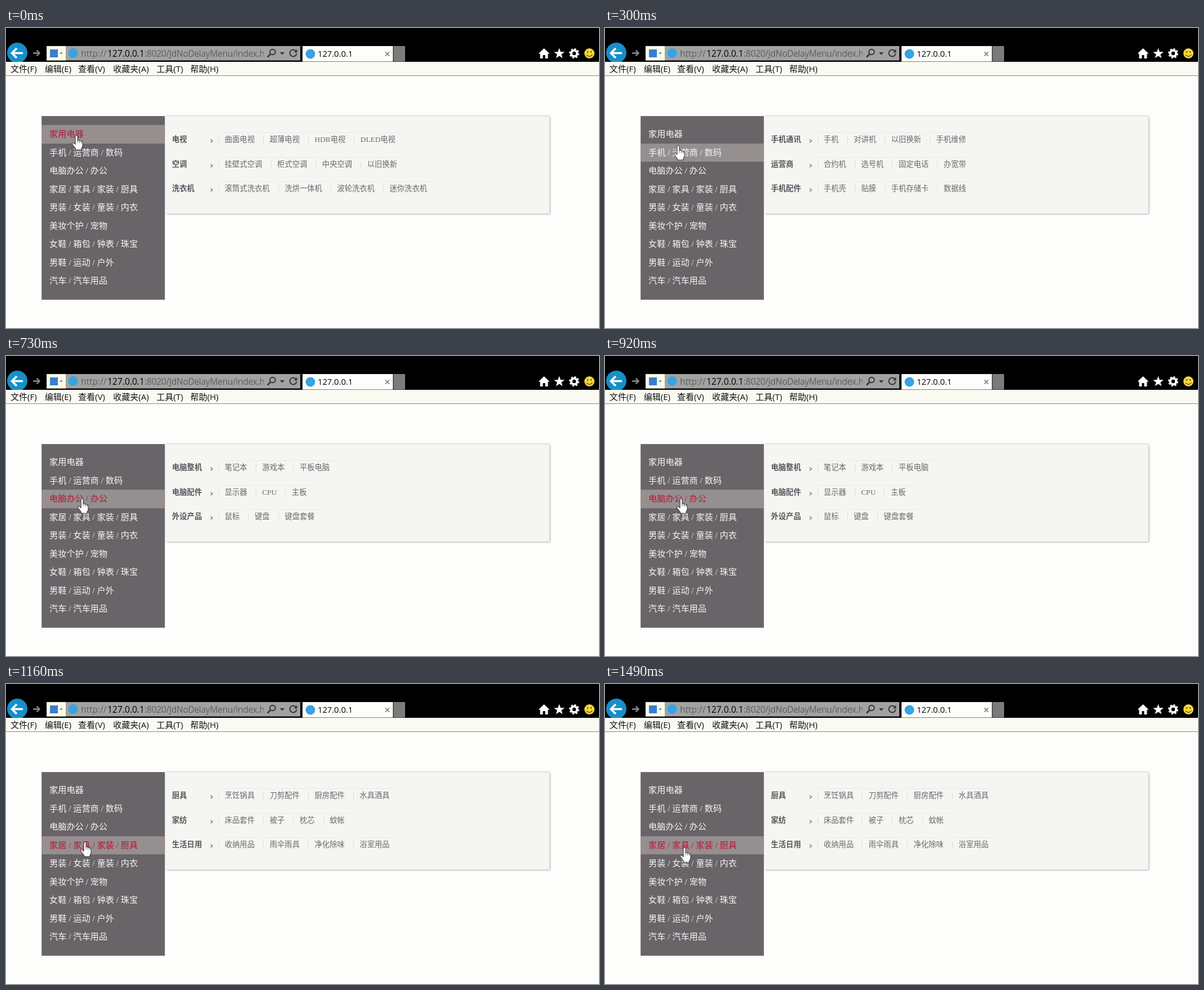
An HTML page for the animation above (1530 ms loop, 1052x532 px).

```html
<!DOCTYPE html>
<html lang="zh-CN">
<head>
<meta charset="utf-8">
<style>
  html, body { margin: 0; width: 100%; height: 100%; overflow: hidden; background: #fdfdfb; }
  svg { position: absolute; left: 0; top: 0; }
  .ui { font-family: "Open Sans", "Noto Sans CJK SC", sans-serif; }
  #side, #panel { position: absolute; top: 156px; font-family: "Liberation Serif", "Noto Sans CJK SC", serif; white-space: nowrap; }
  #side { left: 63px; width: 219px; height: 325.5px; background: #696468; box-shadow: inset 0 0 0 1px #807b80;
    color: #f6f5f6; font-size: 15.2px; font-weight: 300; }
  #side div { position: absolute; left: 0; width: 205px; height: 32.5px; padding-left: 14px; line-height: 32px; }
  #side .on { background: #958f90; }
  #side .hot { color: #b81538; }
  #panel { left: 284px; width: 680px; height: 173px; background: #f5f5f2; font-size: 13.3px; color: #69676d;
    box-shadow: 0 -1px 0 #d3d3da, 1px 1px 3px #a9a9b4; }
  .row { position: absolute; left: 10.5px; height: 24px; line-height: 24px; }
  .row b { color: #59565c; }
  .row svg { left: 67px; top: 10px; }
  .items { position: absolute; left: 82px; top: 0; display: flex; border-top: 1px solid #ebebee; margin-top: -1px; }
  .items span { position: relative; padding: 0 15.1px 0 11.5px; }
  .items span:last-child { padding-right: 12px; }
  .items span::before { content: ""; position: absolute; left: 0; top: 6px; width: 1px; height: 13px; background: #dcdce0; }
</style>
</head>
<body>
<svg class="ui" width="1052" height="532">
  <rect width="1052" height="60" fill="#000"/>
  <circle cx="20" cy="44" r="18" fill="#168fca"/>
  <rect y="60" width="1052" height="24" fill="#fafaf2"/>
  <rect y="84" width="1052" height="1" fill="#8b8967"/>
  <path d="M30 44.500H11M19 36l-8.500 8.500L19 53" fill="none" stroke="#fff" stroke-width="3.600"/>
  <path d="M48 44.500H59M54.500 39.500l5 5-5 5" fill="none" stroke="#8c8c8c" stroke-width="2.400"/>

  <rect x="72" y="32" width="450" height="25.500" fill="#a2a2a2"/>
  <rect x="72" y="32" width="34" height="25.500" fill="#fafae9"/>
  <rect x="78" y="38" width="14" height="14" fill="#3b7dd0"/>
  <path d="M95.500 43.500h5l-2.500 3z" fill="#3b6ea8"/>
  <circle cx="119" cy="44.500" r="8.500" fill="#36a3e2"/>
  <clipPath id="url"><rect x="130" y="32" width="327" height="26"/></clipPath>
  <g clip-path="url(#url)" font-size="15.5" fill="#5d5d5d">
    <text x="133" y="50.500">http://</text>
    <text x="180" y="50.500" fill="#000">127.0.0.1</text>
    <text x="246" y="50.500" letter-spacing="-.3">:8020/JdNoDelayMenu/index.html</text>
  </g>
  <g fill="none" stroke="#333" stroke-width="2">
    <circle cx="473" cy="42.500" r="4.800"/>
    <path d="M469.500 46l-5.500 5.500" stroke-width="2.600"/>
    <path d="M514.500 41a6 6 0 1 0 1 4.500"/>
  </g>
  <path d="M486 43h8l-4 4.500z M516.500 37.500v6h-6z" fill="#333"/>

  <rect x="526" y="32" width="160.500" height="27.500" fill="#fdfdfb"/>
  <circle cx="540" cy="46" r="8.500" fill="#36a3e2"/>
  <text x="553" y="51" font-size="14.7">127.0.0.1</text>
  <path d="M673 42.500l7 7m0-7l-7 7" stroke="#8a8a8a" stroke-width="1.800"/>
  <rect x="687.500" y="32" width="20.500" height="27.500" fill="#7b7b7b"/>

  <path d="M954.500 36l10 9.500h-3V54h-5v-6h-4v6h-5v-8.500h-3z" fill="#fff"/>
  <path id="star" fill="#fff"/>
  <circle cx="1008" cy="45" r="5.200" fill="none" stroke="#fff" stroke-width="4"/>
  <circle cx="1008" cy="45" r="7.500" fill="none" stroke="#fff" stroke-width="3" stroke-dasharray="3.200 2.690"/>
  <circle cx="1035" cy="45" r="9" fill="#f4d53c"/>
  <path d="M1030 47.500q5 6 10 0" fill="none" stroke="#6b5510" stroke-width="1.300"/>
  <path d="M1032 41v3m6-3v3" stroke="#6b5510" stroke-width="1.800"/>
  <g id="bar" font-size="15" fill="#111"></g>
</svg>

<div id="side"></div>
<div id="panel"></div>

<svg width="1052" height="532">
  <g id="hand" fill="#fff" stroke="#3a383c" stroke-width="1.100" stroke-linejoin="round">
    <path d="M-2 2a2 2 0 0 1 4 0V9q2.500-1 3.500 1q2.500-.8 3.200 1q2.300-.5 2.300 2V18q0 3-2 5V26H-1.500V24L-7 16.500q-1.500-2.500.5-3q1.500-.3 4.500 3z"/>
    <path d="M2 9v4.500M5.500 10v4M8.700 11v3.500" fill="none" stroke-width=".8"/>
  </g>
</svg>

<script>
const LOOP = 1530, TOP = 172, ROW = 32.5;
const $ = id => document.getElementById(id);

const bar = [[8, '文件(F)'], [68.7, '编辑(E)'], [128, '查看(V)'], [190, '收藏夹(A)'], [267, '工具(T)'], [327, '帮助(H)']];
const menu = ['家用电器', '手机 / 运营商 / 数码', '电脑办公 / 办公', '家居 / 家具 / 家装 / 厨具',
  '男装 / 女装 / 童装 / 内衣', '美妆个护 / 宠物', '女鞋 / 箱包 / 钟表 / 珠宝', '男鞋 / 运动 / 户外', '汽车 / 汽车用品'];
// Each line: heading, then its links.
const panels = [
  ['电视 曲面电视 超薄电视 HDR电视 DLED电视', '空调 挂壁式空调 柜式空调 中央空调 以旧换新', '洗衣机 滚筒式洗衣机 洗烘一体机 波轮洗衣机 迷你洗衣机'],
  ['手机通讯 手机 对讲机 以旧换新 手机维修', '运营商 合约机 选号机 固定电话 办宽带', '手机配件 手机壳 贴膜 手机存储卡 数据线'],
  ['电脑整机 笔记本 游戏本 平板电脑', '电脑配件 显示器 CPU 主板', '外设产品 鼠标 键盘 键盘套餐'],
  ['厨具 烹饪锅具 刀剪配件 厨房配件 水具酒具', '家纺 床品套件 被子 枕芯 蚊帐', '生活日用 收纳用品 雨伞雨具 净化除味 浴室用品']
];
// Pointer tip: time, x, y
const path = [[0, 125, 190], [170, 128, 202], [500, 133, 218], [700, 135, 253], [930, 135, 253],
  [1160, 140, 280], [1490, 141, 290], [LOOP, 141, 290]];

$('bar').innerHTML = bar.map(([x, s]) => `<text x="${x}" y="78">${s}</text>`).join('');
$('side').innerHTML = menu.map((s, i) => `<div style="top:${TOP - 156 + i * ROW}px">${s}</div>`).join('');
const chevron = '<svg width="6" height="8"><path d="M1 1.500l3.500 2.700L1 7" fill="none" stroke="#66646a" stroke-width="1.100"/></svg>';
const line = (s, i) => {
  const [head, ...links] = s.split(' ');
  return `<div class="row" style="top:${30 + i * 43.7}px"><b>${head}</b>${chevron}` +
    `<div class="items">${links.map(l => `<span>${l}</span>`).join('')}</div></div>`;
};
$('panel').innerHTML = panels.map(p => `<section>${p.map(line).join('')}</section>`).join('');
$('star').setAttribute('d', 'M' + Array.from({ length: 10 }, (_, i) => {
  const r = i % 2 ? 4 : 10, a = i * Math.PI / 5;
  return `${981.5 + r * Math.sin(a)} ${45.5 - r * Math.cos(a)}`;
}).join('L') + 'z');

const rows = [...$('side').children], sections = [...$('panel').children];

function draw(t) {
  const k = path.findIndex(p => p[0] > t);
  const [t0, x0, y0] = path[k - 1], [t1, x1, y1] = path[k];
  const f = (t - t0) / (t1 - t0);
  const x = Math.round(x0 + (x1 - x0) * f), y = Math.round(y0 + (y1 - y0) * f);
  const pos = (y - TOP) / ROW, active = Math.floor(pos);
  const overText = Math.abs(pos - active - .5) * ROW < 11;
  $('hand').setAttribute('transform', `translate(${x} ${y})`);
  rows.forEach((r, i) => {
    r.classList.toggle('on', i === active);
    r.classList.toggle('hot', i === active && overText);
  });
  sections.forEach((s, i) => s.style.display = i === active ? 'block' : 'none');
}

const start = performance.now();
function tick() {
  draw((performance.now() - start) % LOOP);
  requestAnimationFrame(tick);
}
tick();
</script>
</body>
</html>
```
